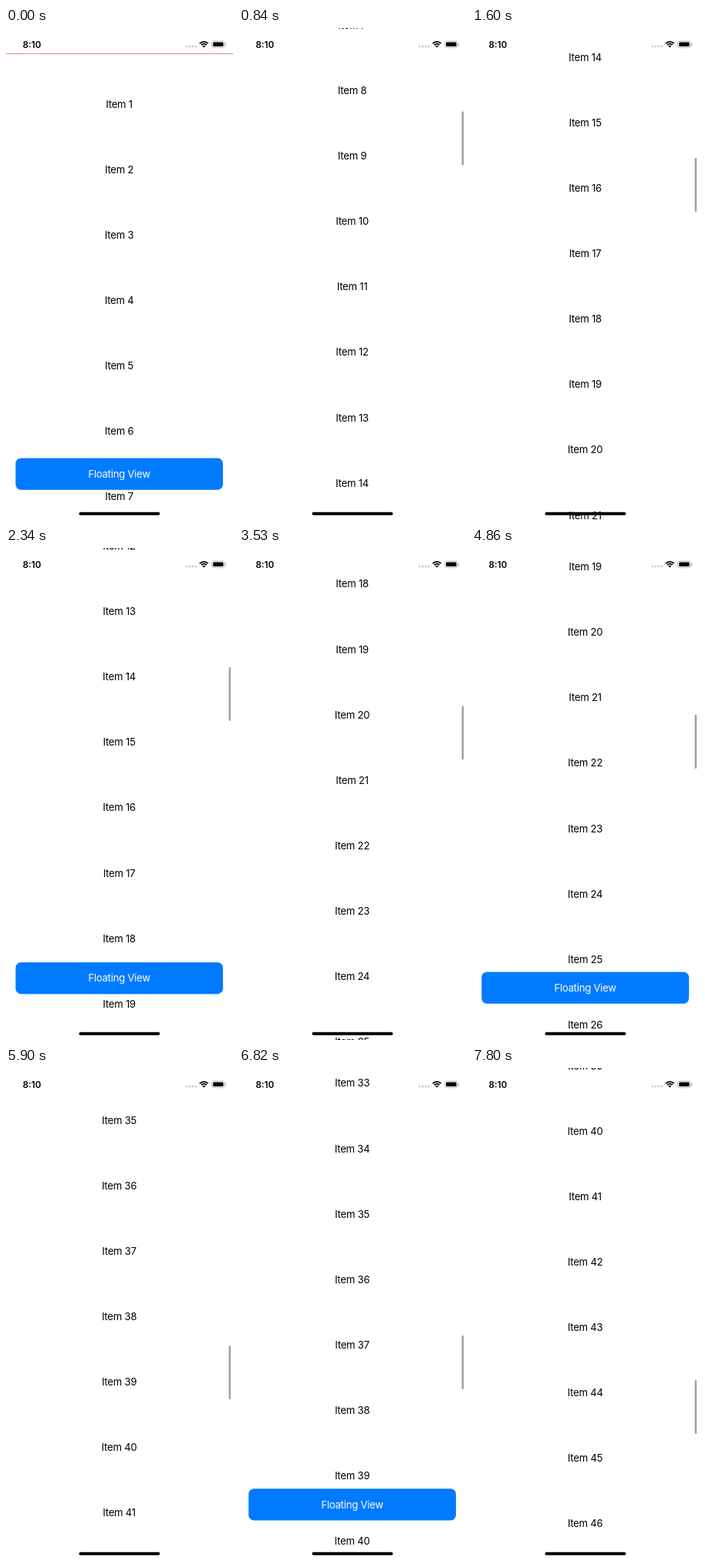
Animation, 296 px wide and 640 px high, one loop 8000 ms. Source, as an HTML page with a canvas:

```html
<!DOCTYPE html>
<html lang="en">
<head>
<meta charset="utf-8">
<title>Floating view over a list</title>
<style>
  html, body { margin: 0; width: 100%; height: 100%; overflow: hidden; background: #fff; }
  canvas { display: block; width: 296px; height: 640px; }
</style>
</head>
<body>
<canvas id="stage"></canvas>
<script>
const W = 296, H = 640, LOOP = 8000;
const FONT = 'Inter, Roboto, sans-serif';
const PITCH = 85.1, FIRST_Y = 99, ITEMS = 60;
const CARD_Y = 559.5, CARD_HIDDEN = 126;

const canvas = document.getElementById('stage');
const ctx = canvas.getContext('2d');
const ratio = window.devicePixelRatio || 1;
canvas.width = W * ratio;
canvas.height = H * ratio;

// Runs of evenly spaced picture changes: start, end, count
const RUNS = [
  [500, 1290, 8], [1400, 1600, 3], [1720, 1720, 1],
  [1890, 2340, 5], [2440, 2670, 3], [2780, 3530, 8], [3650, 3870, 3],
  [4120, 4860, 8], [4970, 5700, 8], [5800, 5900, 2],
  [6160, 6820, 7], [6920, 6920, 1], [7020, 7800, 8]
];

function snap(t) {
  let last = 0;
  for (const [a, b, n] of RUNS) {
    if (t < a) break;
    const gap = n > 1 ? (b - a) / (n - 1) : 1;
    last = a + gap * Math.min(n - 1, Math.floor((t - a) / gap + 1e-6));
  }
  return last;
}

const flick = (t, tau) => 1 - (1 + t / tau) * Math.exp(-t / tau);
const easeOut = u => 1 - (1 - u) ** 2;

// Flicks have a time constant; drags ease out over their span
const MOVES = [
  { from: 420, to: 1720, by: 1230, tau: 250 },
  { from: 1850, to: 2800, by: -196 },
  { from: 2880, to: 3870, by: 915.5, tau: 350 },
  { from: 4020, to: 4900, by: -94 },
  { from: 4900, to: 5900, by: 1451, tau: 250 },
  { from: 6070, to: 6900, by: -123 },
  { from: 6920, to: 8000, by: 676, tau: 300 }
];

function scrollAt(t) {
  let y = 0;
  for (const { from, to, by, tau } of MOVES) {
    if (t <= from) break;
    const d = Math.min(t, to) - from;
    y += by * (tau ? flick(d, tau) : easeOut(d / (to - from)));
  }
  return y;
}

// Fraction of the distance left after t ms
function spring(t) {
  const w = 9.5, zeta = 0.5, s = t / 1000;
  const wd = w * Math.sqrt(1 - zeta * zeta);
  return Math.exp(-zeta * w * s) * (Math.cos(wd * s) + zeta * w / wd * Math.sin(wd * s));
}

const TOGGLES = [480, 1958, 2960, 4320, 4990, 6320, 7000];

function cardOffset(t) {
  let off = 0;
  TOGGLES.forEach((start, i) => {
    if (t <= start) return;
    const target = i % 2 ? 0 : CARD_HIDDEN;
    const end = Math.min(t, TOGGLES[i + 1] || LOOP);
    off = target + (off - target) * spring(end - start);
  });
  return off;
}

function pill(x, y, w, h, r, color) {
  ctx.fillStyle = color;
  ctx.beginPath();
  ctx.roundRect(x, y, w, h, r);
  ctx.fill();
}

function label(text, y, color) {
  ctx.font = '400 13.2px ' + FONT;
  ctx.letterSpacing = '-0.25px';
  ctx.textAlign = 'center';
  ctx.fillStyle = color;
  ctx.fillText(text, 147.6, y + 4.8);
}

function drawList(scroll) {
  if (scroll < 33) {
    ctx.fillStyle = '#d9908c';
    ctx.fillRect(0, 33 - scroll, W, 1);
  }
  for (let i = 0; i < ITEMS; i++) {
    const y = FIRST_Y + i * PITCH - scroll;
    if (y > -12 && y < H + 12) label('Item ' + (i + 1), y, '#000');
  }
}

function drawCard(offset) {
  const y = CARD_Y + offset;
  if (y > H) return;
  pill(12.5, y, 270.4, 41.2, 7, '#007aff');
  label('Floating View', y + 20.7, '#fff');
}

function drawStatusBar() {
  ctx.font = '600 11.8px ' + FONT;
  ctx.letterSpacing = '0px';
  ctx.textAlign = 'left';
  ctx.fillStyle = '#000';
  ctx.fillText('8:10', 21.8, 25.8);

  for (let i = 0; i < 4; i++) pill(234.3 + i * 3.9, 22.8, 2.6, 2.6, 1.3, '#c4c4c6');

  const cx = 258, cy = 25.6, a = Math.PI / 4;
  ctx.fillStyle = ctx.strokeStyle = '#000';
  ctx.lineWidth = 1.7;
  for (const r of [4.9, 7.7]) {
    ctx.beginPath();
    ctx.arc(cx, cy, r, -Math.PI / 2 - a, -Math.PI / 2 + a);
    ctx.stroke();
  }
  ctx.beginPath();
  ctx.moveTo(cx, cy);
  ctx.arc(cx, cy, 2.8, -Math.PI / 2 - a, -Math.PI / 2 + a);
  ctx.fill();

  ctx.strokeStyle = '#a6a6a6';
  ctx.lineWidth = 0.8;
  ctx.beginPath();
  ctx.roundRect(268.4, 17.1, 16.6, 8.4, 2.5);
  ctx.stroke();
  pill(269.9, 18.6, 13.6, 5.4, 1.3, '#000');
  pill(285.9, 19.8, 1.1, 3, 0.6, '#a6a6a6');
}

function draw(t) {
  const scroll = scrollAt(t);
  ctx.setTransform(ratio, 0, 0, ratio, 0, 0);
  ctx.fillStyle = '#fff';
  ctx.fillRect(0, 0, W, H);
  drawList(scroll);
  if (scroll > 0) pill(290.6, 41.5 + scroll * 0.1093, 2.3, 70, 1.15, '#999');
  drawCard(cardOffset(t));
  drawStatusBar();
  pill(95.2, 629.8, 105.5, 4, 2, '#000');
}

const begin = performance.now();
function tick() {
  draw(snap((performance.now() - begin) % LOOP));
  requestAnimationFrame(tick);
}
tick();
</script>
</body>
</html>
```
